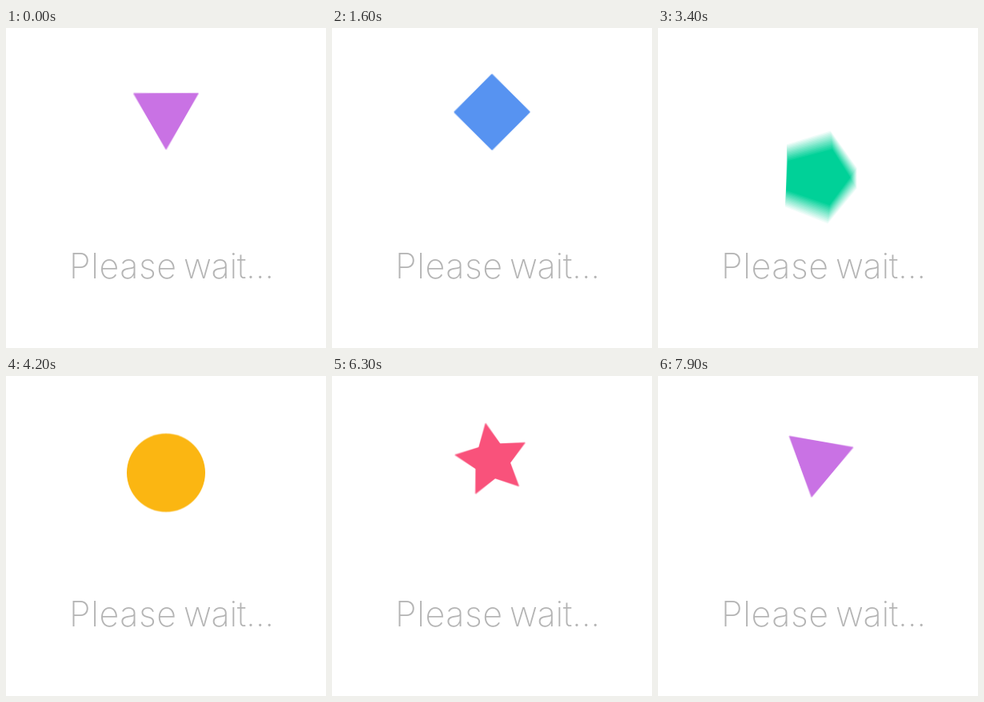
An HTML page with a canvas that plays this animation: 400 by 400 pixels, repeating every 8 s.

```html
<!DOCTYPE html>
<html lang="en">
<head>
<meta charset="utf-8">
<title>Please wait</title>
<style>
  html, body { margin: 0; width: 100%; height: 100%; overflow: hidden; background: #fff; }
  canvas { position: absolute; left: 0; top: 0; }
</style>
</head>
<body>
<canvas id="text" width="400" height="400"></canvas>
<canvas id="shape" width="400" height="400"></canvas>
<script>
const SIZE = 400, CYCLE = 1600, HIT = 265, CX = 200, TOP = 105, DROP = 140;
const SHUTTER = 30, SAMPLES = 16;
const RAD = Math.PI / 180;

// Each shape rests at `rest` degrees (first corner) at the top of its bounce.
const shapes = [
  { color: '#c972e4', corners: 3, rest: 90, dir: -1, r: 47.5 },
  { color: '#5793f1', corners: 4, rest: -90, dir: -1, r: 48 },
  { color: '#00d198', corners: 5, rest: -90, dir: 1, r: 48.8 },
  { color: '#fbb612', corners: 0, rest: 0, dir: -1, r: 49 },
  { color: '#f9527b', corners: 5, rest: -90, dir: 1, r: 47.5, inner: 0.49 }
];

const shapeCtx = document.getElementById('shape').getContext('2d');
const textCtx = document.getElementById('text').getContext('2d');

const label = document.createElement('canvas');
label.width = SIZE;
label.height = 60;
const labelCtx = label.getContext('2d');
labelCtx.font = '250 43px Inter, "Open Sans", sans-serif';
labelCtx.fillStyle = '#b4b4b4';
labelCtx.letterSpacing = '0.6px';
labelCtx.fillText('Please', 79, 43);
labelCtx.letterSpacing = '-0.3px';
labelCtx.fillText('wait...', 222, 43);

function pose(time) {
  const cycle = Math.floor(time / CYCLE);
  const t = time - cycle * CYCLE;
  const falling = t < HIT;
  const index = (cycle + (falling ? 0 : 1) + 5) % 5;
  const { dir } = shapes[index];
  if (falling) {
    return { index, y: TOP + DROP * (t / HIT) ** 2, turn: dir * t / 10 };
  }
  const left = CYCLE - t, x = left / (CYCLE - HIT), h = left / 100;
  return {
    index,
    y: TOP + 109 * x ** 2.4 + 31 * x ** 12,
    turn: -dir * (10 * h + 0.011 * h ** 4)
  };
}

function trace(ctx, { index, y, turn }) {
  const { corners, rest, r, inner } = shapes[index];
  ctx.beginPath();
  if (!corners) {
    ctx.arc(CX, y, r, 0, 2 * Math.PI);
    return;
  }
  const count = inner ? corners * 2 : corners;
  for (let i = 0; i < count; i++) {
    const a = (rest + turn + i * 360 / count) * RAD;
    const d = inner && i % 2 ? r * inner : r;
    ctx.lineTo(CX + d * Math.cos(a), y + d * Math.sin(a));
  }
  ctx.closePath();
}

function drawShape(time) {
  const ctx = shapeCtx;
  const now = pose(time);
  ctx.globalCompositeOperation = 'source-over';
  ctx.clearRect(0, 0, SIZE, SIZE);
  // Motion blur: add up coverage over the shutter, then tint it.
  ctx.globalCompositeOperation = 'lighter';
  ctx.globalAlpha = 1 / SAMPLES;
  ctx.fillStyle = '#000';
  for (let i = 0; i < SAMPLES; i++) {
    const p = pose(time + SHUTTER * ((i + 0.5) / SAMPLES - 0.5));
    trace(ctx, p.index === now.index ? p : now);
    ctx.fill();
  }
  ctx.globalAlpha = 1;
  ctx.globalCompositeOperation = 'source-in';
  ctx.fillStyle = shapes[now.index].color;
  ctx.fillRect(0, 0, SIZE, SIZE);
}

// Vertical push on the text after a hit: a damped oscillation.
function dent(t) {
  const s = t - HIT;
  if (s < 0 || s > 700) return 0;
  if (s < 35) return 9.5 * s / 35;
  const u = s - 35;
  return 10 * Math.exp(-u / 600) * (1 - s / 700) * Math.cos(2 * Math.PI * u / 160);
}

function drawText(time) {
  const depth = dent(time % CYCLE);
  textCtx.clearRect(0, 0, SIZE, SIZE);
  for (let x = 0; x < SIZE; x++) {
    const d = Math.abs(x - 197) / 112;
    const bend = d < 1 ? depth * Math.cos(d * Math.PI / 2) ** 2 : 0;
    textCtx.drawImage(label, x, 0, 1, 60, x, 270 + bend, 1, 60);
  }
}

const start = performance.now();
function frame() {
  const time = (performance.now() - start) % (CYCLE * 5);
  drawShape(time);
  drawText(time);
  requestAnimationFrame(frame);
}
frame();
</script>
</body>
</html>
```
